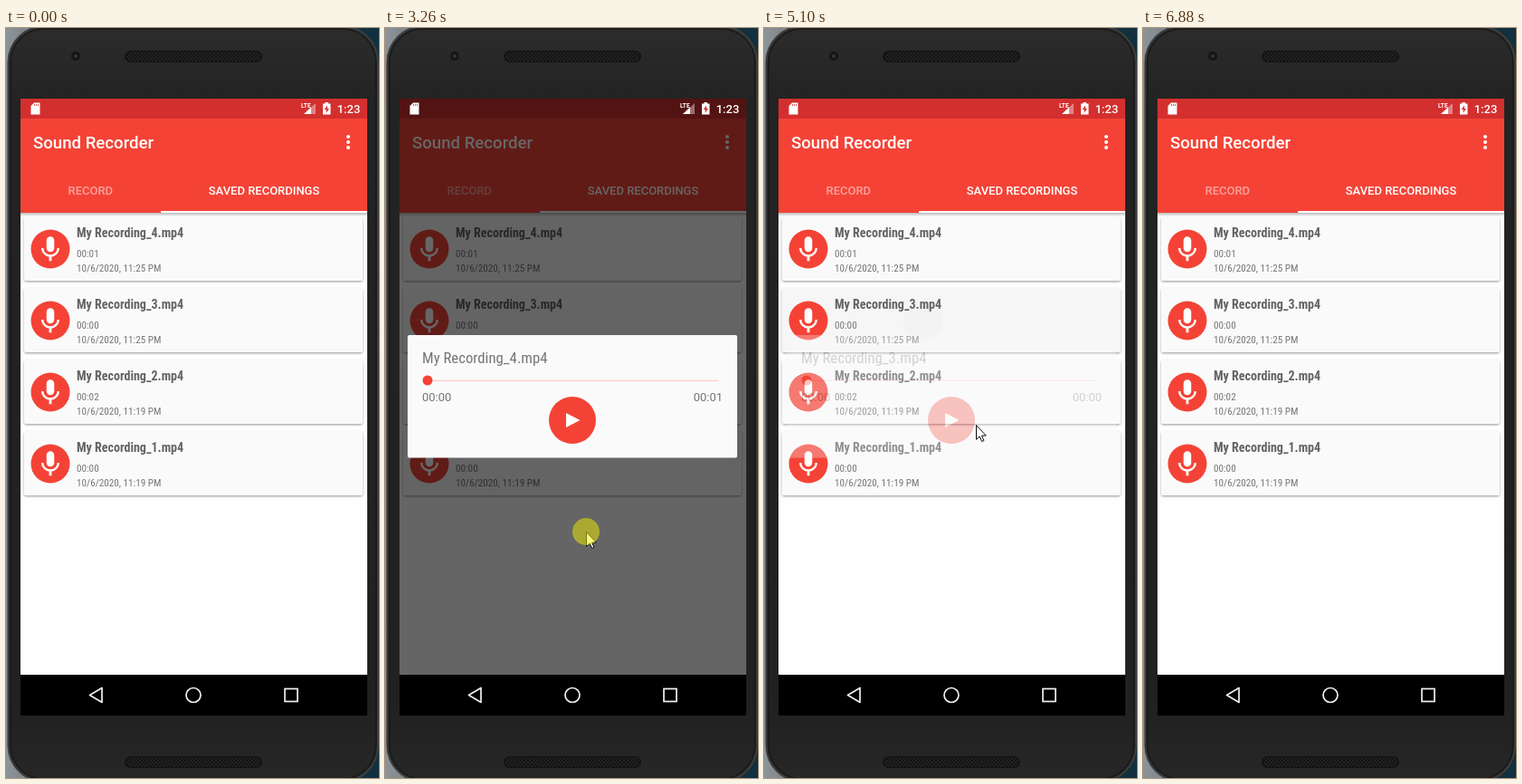
These frames come from a looping animation (412x828 px, 7830 ms). An HTML page:

```html
<!DOCTYPE html>
<html lang="en">
<head>
<meta charset="utf-8">
<title>Sound Recorder</title>
<style>
html, body { margin: 0; width: 100%; height: 100%; overflow: hidden; background: #1d2429; }
svg { display: block; width: 412px; height: 828px; }
text { font-family: Roboto, sans-serif; fill: #757575; }
.medium { font-weight: 500; fill: #fff; }
.narrow { font-family: "Roboto Condensed", Roboto, sans-serif; font-stretch: 75%; }
.tight .narrow { letter-spacing: -.062em; }
.name { font-size: 14px; font-weight: 700; fill: #636363; }
.small { font-size: 11.17px; }
.mid { text-anchor: middle; }
.end { text-anchor: end; }
</style>
</head>
<body>
<svg id="stage" viewBox="0 0 412 828">
  <defs>
    <linearGradient id="desk" x2="1" y2="0">
      <stop offset="0" stop-color="#8d9499"/>
      <stop offset=".12" stop-color="#70787d"/>
      <stop offset=".3" stop-color="#20262a"/>
      <stop offset="1" stop-color="#12303f"/>
    </linearGradient>
    <linearGradient id="body" x2="0" y2="1">
      <stop offset="0" stop-color="#2c2c2c"/>
      <stop offset=".1" stop-color="#232323"/>
      <stop offset=".9" stop-color="#212121"/>
      <stop offset="1" stop-color="#272727"/>
    </linearGradient>
    <linearGradient id="fall" x2="0" y2="1">
      <stop offset="0" stop-opacity=".28"/>
      <stop offset="1" stop-opacity="0"/>
    </linearGradient>
    <pattern id="mesh" width="4" height="4" patternUnits="userSpaceOnUse">
      <circle cx="1" cy="1" r=".8" fill="#343434"/>
      <circle cx="3" cy="3" r=".8" fill="#343434"/>
    </pattern>
    <filter id="soft" x="-5%" y="-10%" width="110%" height="130%">
      <feDropShadow dx="0" dy="1.2" stdDeviation="1" flood-opacity=".38"/>
    </filter>
    <g id="speaker">
      <rect width="152" height="13" rx="6.5" fill="#131313"/>
      <rect x="2" y="1" width="148" height="11" rx="5.5" fill="url(#mesh)"/>
    </g>
    <g id="mic">
      <circle r="21.5" fill="#f44336"/>
      <path transform="scale(1.42) translate(-12 -11.7)" fill="#fff" d="M12 14c1.66 0 3-1.34 3-3V5c0-1.66-1.34-3-3-3S9 3.34 9 5v6c0 1.66 1.34 3 3 3zm5.3-3c0 3-2.54 5.1-5.3 5.1S6.700 14 6.700 11H5c0 3.410 2.720 6.230 6 6.720V21h2v-3.280c3.280-.480 6-3.300 6-6.720z"/>
    </g>
  </defs>

  <rect width="412" height="828" fill="url(#desk)"/>
  <rect x="2.500" y="-2" width="408.500" height="834" rx="40" fill="url(#body)" stroke="#3d3d3d" stroke-width="2"/>
  <rect x="5" y="1" width="403.500" height="828" rx="37" fill="none" stroke="#1a1a1a" stroke-width="1.500"/>
  <use href="#speaker" x="131" y="25"/>
  <use href="#speaker" x="131" y="804"/>
  <circle cx="77" cy="31" r="5" fill="#151515"/>
  <circle cx="77" cy="31" r="2" fill="#34343a"/>

  <rect x="16" y="78" width="383" height="681" fill="#fefefe"/>
  <rect x="16" y="204" width="383" height="4" fill="url(#fall)"/>
  <rect x="16" y="78" width="383" height="22" fill="#d32f2f"/>
  <rect x="16" y="100" width="383" height="104" fill="#f44336"/>
  <rect x="171" y="202" width="228" height="2" fill="#fff"/>
  <text class="medium" x="30" y="133" font-size="18.620">Sound Recorder</text>
  <text class="medium mid" x="93.300" y="183.500" font-size="13" fill-opacity=".5">RECORD</text>
  <text class="medium mid" x="285" y="183.500" font-size="13">SAVED RECORDINGS</text>
  <g fill="#fff">
    <circle cx="378" cy="120" r="2"/><circle cx="378" cy="126" r="2"/><circle cx="378" cy="132" r="2"/>
  </g>

  <g id="list"></g>
  <rect id="dim" x="16" y="78" width="383" height="636" opacity="0"/>

  <g id="dialog" opacity="0">
    <rect x="25" y="339" width="364" height="135.500" rx="2" fill="#fafafa"/>
    <text id="title" class="narrow" x="41" y="370" font-size="16.760"></text>
    <path d="M47 389.300H368" stroke="#fbcbc6" stroke-width="1.300"/>
    <circle cx="47" cy="389" r="5.500" fill="#f44336"/>
    <text x="41" y="412" font-size="13">00:00</text>
    <text id="total" class="end" x="373" y="412" font-size="13"></text>
    <circle cx="207" cy="433" r="26" fill="#f44336"/>
    <path d="M200 425V441L215.500 433Z" fill="#fff"/>
  </g>

  <g fill="#fff">
    <path d="M31 82.500H37.500V95.500H27.500V86Z"/>
    <path d="M31.500 84v2M33.500 84v2M35.500 84v2" stroke="#d32f2f" stroke-width=".8"/>
    <path d="M342 83V95H329Z" opacity=".4"/>
    <path d="M337 87.600V95H329Z"/>
    <text class="medium" x="326" y="87.500" font-size="6.500" style="font-weight:700">LTE</text>
    <path d="M352.500 82H356V83.500H358.500V95.500H350V83.500H352.500Z"/>
    <path d="M355 85.500L351.700 90H353.700V93.700L357 89H355Z" fill="#d32f2f"/>
    <text class="medium end" x="391.300" y="94" font-size="13">1:23</text>
  </g>

  <rect x="16" y="714" width="383" height="45"/>
  <g fill="none" stroke="#f0f0f0" stroke-width="1.700">
    <path d="M106 728.500V744.500L92.500 736.500Z" stroke-linejoin="round"/>
    <circle cx="207" cy="736.500" r="8"/>
    <rect x="308" y="729.500" width="14" height="14"/>
  </g>

  <g id="cursor">
    <path d="M.5 .5V16.300L4.200 12.900 6.700 18.500 8.900 17.500 6.500 12H11.300Z" fill="#fff" stroke="#000" stroke-width=".95"/>
    <circle id="press" r="15" fill="#f0f000" fill-opacity=".5"/>
  </g>
</svg>
<script>
const $ = id => document.getElementById(id);
const LOOP = 7830, TICK = 77.2;

const rows = [
  ['My Recording_4.mp4', '00:01', '10/6/2020, 11:25 PM'],
  ['My Recording_3.mp4', '00:00', '10/6/2020, 11:25 PM'],
  ['My Recording_2.mp4', '00:02', '10/6/2020, 11:19 PM'],
  ['My Recording_1.mp4', '00:00', '10/6/2020, 11:19 PM']
];

$('list').innerHTML = rows.map(([name, length, date], i) => `
  <g transform="translate(0 ${i * 79})">
    <rect x="20" y="208" width="374" height="71" rx="3" fill="#fafafa" filter="url(#soft)"/>
    <clipPath id="clip${i}"><rect x="20" y="208" width="374" height="71" rx="3"/></clipPath>
    <g clip-path="url(#clip${i})">
      <rect id="shade${i}" x="20" y="208" width="374" height="71" opacity="0"/>
      <circle id="ripple${i}" cy="244" opacity="0"/>
    </g>
    <use href="#mic" x="49" y="244"/>
    <text class="narrow name" x="78" y="231">${name}</text>
    <text class="narrow small" x="78" y="253">${length}</text>
    <text class="narrow small" x="78" y="268.500">${date}</text>
  </g>`).join('');

// Tighten the spacing when no condensed face is available.
if (document.querySelector('.name').getComputedTextLength() > 124) $('stage').classList.add('tight');

// All keys below are [tick, value, ...].
const path = [
  [3, 395, 812], [5, 330, 640], [7, 205, 365], [9, 105, 187], [10, 97, 172],
  [12, 125, 235], [13, 138, 253], [15, 136, 247], [17, 135, 243], [25, 135, 243],
  [27, 142, 260], [30, 180, 330], [34, 222, 408], [38, 225, 505], [41, 222, 556],
  [45, 222, 556], [47, 196, 440], [49, 164, 327], [53, 164, 327], [55, 186, 375],
  [57, 222, 448], [60, 226, 442], [65, 226, 438], [68, 249, 437], [71, 244, 505],
  [74, 233, 598], [78, 233, 598], [81, 290, 650], [82, 312, 676], [84, 391, 785],
  [85, 370, 806], [87, 365, 811], [88, 359, 820]
];
const presses = [[22, 24], [42, 44], [50, 54], [75, 77]];
const shows = [
  { row: 0, open: 25, close: 44, x: 135 },
  { row: 1, open: 66, close: 77, x: 164 }
];

function at(keys, k) {
  if (k <= keys[0][0]) return keys[0].slice(1);
  for (let i = 1; i < keys.length; i++) {
    const a = keys[i - 1], b = keys[i];
    if (k <= b[0]) {
      const p = (k - a[0]) / (b[0] - a[0]);
      return a.slice(1).map((v, j) => v + (b[j + 1] - v) * p);
    }
  }
  return keys[keys.length - 1].slice(1);
}

function set(id, attrs) {
  for (const name in attrs) $(id).setAttribute(name, attrs[name]);
}

function drawShow({ row, open, close, x }, k) {
  const since = k - open;
  const [grow, alpha, shade] = at([[-2, 0, 0, 0], [0, .25, .01, .015], [2, .85, .11, .09], [5, 1.6, 0, 0]], since);
  set('shade' + row, { opacity: shade });
  set('ripple' + row, { opacity: alpha, r: 89 * grow, cx: x + (207 - x) * Math.min(1, grow * 1.07) });
  if (since < 0 || k > close) return;
  $('title').textContent = rows[row][0];
  $('total').textContent = rows[row][1];
  const [face] = at([[open, .3], [open + 1, .72], [open + 2, 1], [close - 2, 1], [close - 1, .55], [close, .12]], k);
  const [dim] = at([[open, 0], [open + 1, .32], [open + 2, .6], [close - 2, .6], [close - 1, .5], [close, .36]], k);
  set('dialog', { opacity: face });
  set('dim', { opacity: dim });
}

function draw() {
  const k = Math.floor((performance.now() % LOOP + 10) / TICK);
  set('dialog', { opacity: 0 });
  set('dim', { opacity: 0 });
  shows.forEach(s => drawShow(s, k));
  const [x, y] = at(path, k);
  set('cursor', {
    transform: `translate(${Math.round(x)} ${Math.round(y)})`,
    visibility: k >= 3 && k < 89 ? 'visible' : 'hidden'
  });
  set('press', { opacity: presses.some(([a, b]) => k >= a && k < b) ? 1 : 0 });
  requestAnimationFrame(draw);
}
draw();
</script>
</body>
</html>
```
